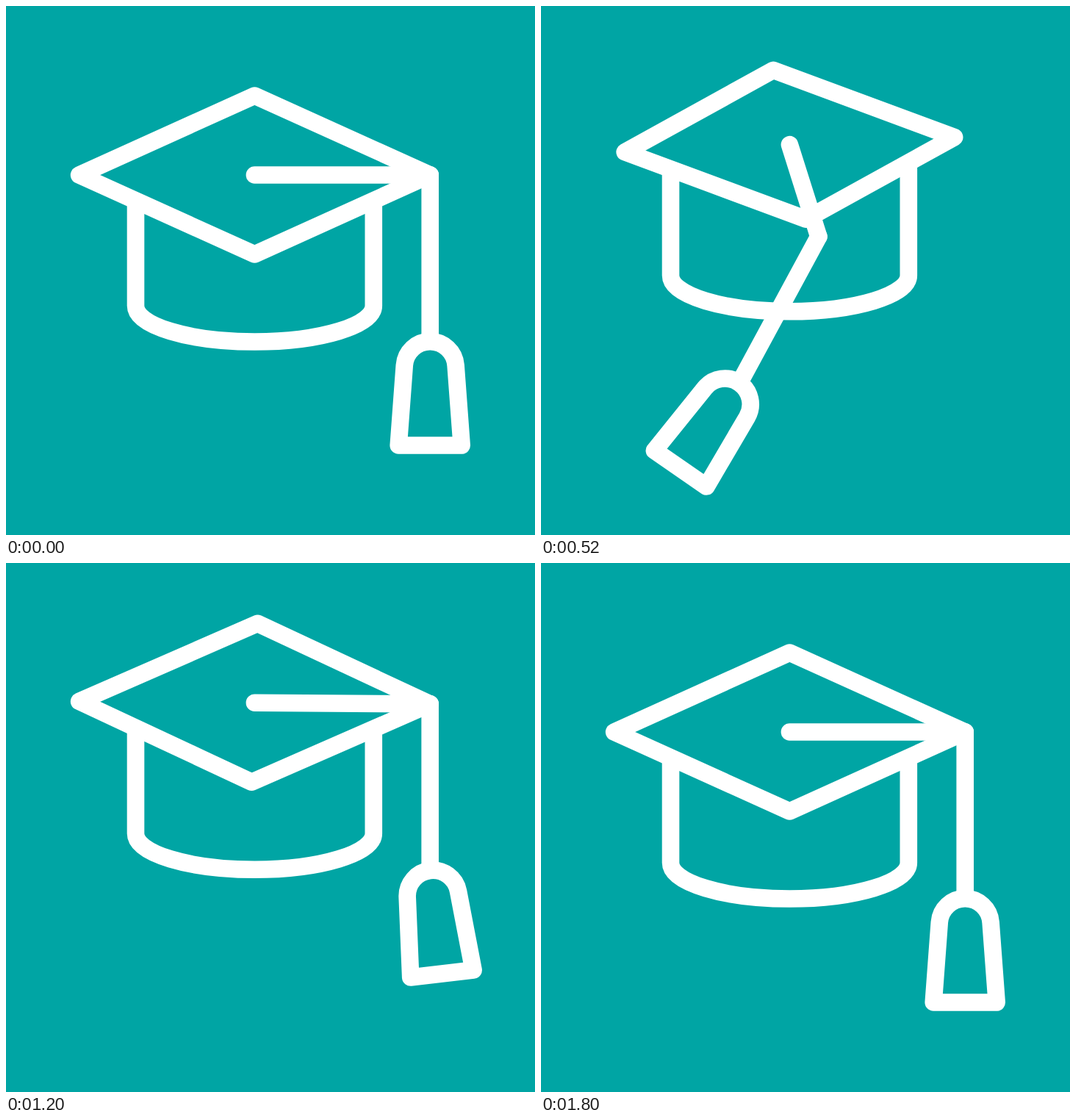
An HTML page for the animation above (2000 ms loop, 720 by 720 pixels).

```html
<!DOCTYPE html>
<html lang="en">
<head>
<meta charset="utf-8">
<title>Graduation cap</title>
<style>
html, body { margin: 0; height: 100%; overflow: hidden; background: #00a5a4; }
svg { display: block; width: 100%; height: 100%; }
</style>
</head>
<body>
<svg viewBox="0 0 720 720" fill="none" stroke="#fff" stroke-width="23.6" stroke-linecap="round" stroke-linejoin="round">
  <g id="cap">
    <path stroke-linecap="butt" d="M176.5 215V408A161.9 49 0 0 0 500.3 408V252"/>
    <path id="streakLeft" pathLength="1" d="M500 386Q338 430 176 378"/>
    <path id="streakRight" pathLength="1" d="M177 328Q258 425 500 393"/>
    <path id="board" fill="#00a5a4"/>
    <path id="arm"/>
    <g id="cord">
      <path d="M0 0V227"/>
      <path id="tassel" fill="#00a5a4" d="M-43 141L-34.9 32A35 35 0 0 1 34.9 32L43 141Z"/>
    </g>
  </g>
</svg>
<script>
const LOOP = 2000, STEP = 40, END = 1800;
const CX = 338.4, CY = 230, RX = 238.8, RY = 108, CORD = 227;
const el = id => document.getElementById(id);

// Sine easing from 0 at time a to 1 at time b.
function ease(t, a, b) {
  const s = Math.min(1, Math.max(0, (t - a) / (b - a)));
  return (1 - Math.cos(Math.PI * s)) / 2;
}

// Rises from a to its peak, then falls back to 0 at b.
const bump = (t, a, peak, b) => ease(t, a, peak) - ease(t, peak, b);

const hop = t => -61 * bump(t, 0, 320, 840) - 42.5 * bump(t, 790, 1280, 1800);
const twist = t => 91 * bump(t, 0, 630, 1240);
const size = t => 1 - .085 * bump(t, 0, 860, 1200);

// The cord trails the cap, swings through and overshoots; the tassel more so.
const cordTurn = t => 38 * bump(t, 242, 660, 1000) - 7 * bump(t, 960, 1080, 1200);
const tasselTurn = t => -28 * bump(t, 0, 280, 480) + 64 * bump(t, 320, 700, 980)
  - 23 * bump(t, 960, 1090, 1262);

function point(deg, rx, ry) {
  const a = deg * Math.PI / 180;
  return [CX + rx * Math.cos(a), CY + ry * Math.sin(a)];
}

function streak(id, tail, head) {
  const length = head - tail, path = el(id);
  path.style.display = length > .002 ? '' : 'none';
  path.setAttribute('stroke-dasharray', `0 ${tail} ${length} 2`);
}

function draw(t) {
  const angle = twist(t), k = size(t), cord = cordTurn(t);
  const corners = [0, 90, 180, 270].map(a => point(angle + a, RX * k, RY * k));
  // The arm lags and reaches forward as it nears the front.
  const front = Math.sin(angle * Math.PI / 180) ** 8;
  const tip = point(angle - 4 * front, RX, 100 + 28 * front);
  el('cap').setAttribute('transform', `translate(0 ${hop(t)})`);
  el('board').setAttribute('d', `M${corners.join('L')}Z`);
  el('arm').setAttribute('d', `M${CX} ${CY}L${tip}`);
  el('cord').setAttribute('transform', `translate(${tip}) rotate(${cord})`);
  el('tassel').setAttribute('transform', `translate(0 ${CORD}) rotate(${tasselTurn(t) - cord})`);
  streak('streakLeft', ease(t, 220, 475), ease(t, 100, 300));
  streak('streakRight', ease(t, 703, 1125), ease(t, 620, 1031));
}

const start = performance.now();
function tick() {
  const t = (performance.now() - start) % LOOP;
  draw(Math.min(END, Math.floor(t / STEP) * STEP));
  requestAnimationFrame(tick);
}
tick();
</script>
</body>
</html>
```
